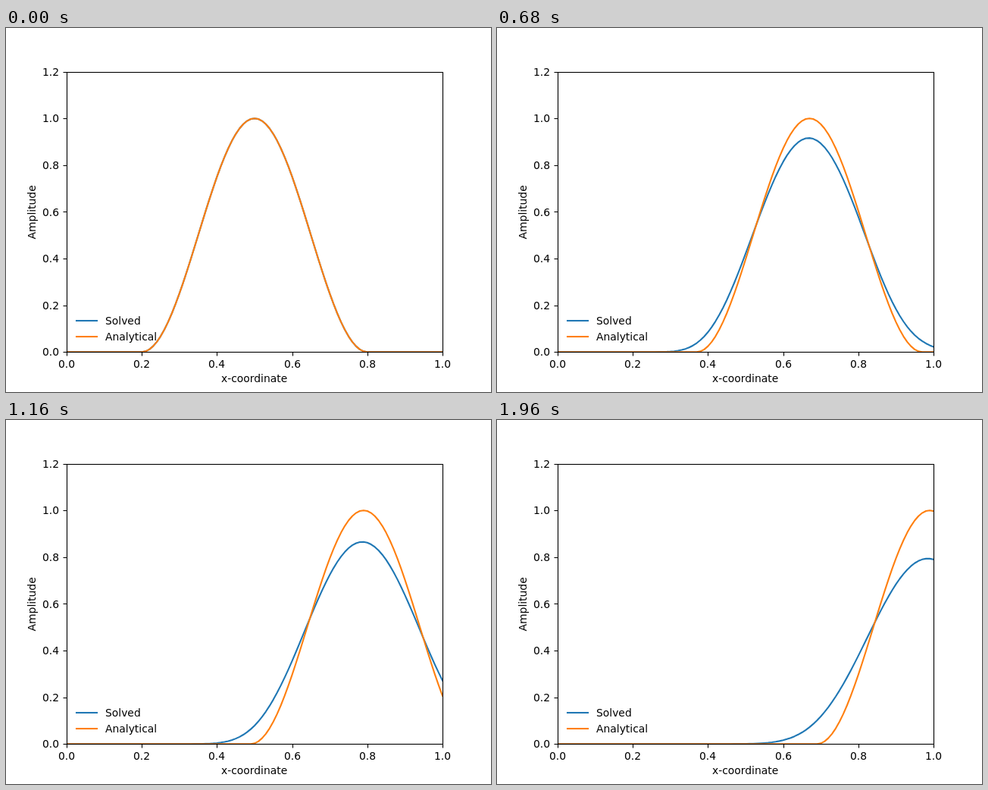
An HTML page with a canvas for the animation above (2 s loop, 640 px wide and 480 px high).

```html
<!DOCTYPE html>
<html lang="en">
<head>
<meta charset="utf-8">
<title>Advection</title>
<style>
html, body { margin: 0; width: 100%; height: 100%; overflow: hidden; background: #fff; }
canvas { display: block; }
</style>
</head>
<body>
<canvas id="plot" width="640" height="480"></canvas>
<script>
const ctx = document.getElementById('plot').getContext('2d');
const STEPS = 50, STEP_MS = 40, CELLS = 100, SHIFT = 0.01;
const LEFT = 80, RIGHT = 576, TOP = 57.6, BOTTOM = 427.2;
const BLUE = '#1f77b4', ORANGE = '#ff7f0e';

const px = x => LEFT + x * (RIGHT - LEFT);
const py = y => BOTTOM - y * (BOTTOM - TOP) / 1.2;
const snap = v => Math.floor(v + 0.5) + 0.5;

// Raised cosine pulse of half width 0.3
function pulse(x, center) {
  const d = Math.abs(x - center);
  return d < 0.3 ? 0.5 + 0.5 * Math.cos(Math.PI * d / 0.3) : 0;
}

const exact = n => Array.from({ length: CELLS + 1 }, (_, i) => pulse(i / CELLS, 0.5 + n * SHIFT));

// Implicit upwind scheme with Courant number 1
function advance(u) {
  let prev = 0;
  return u.map((v, i) => (prev = i ? (v + prev) / 2 : 0));
}

const solved = [exact(0)];
while (solved.length < STEPS) solved.push(advance(solved[solved.length - 1]));

function line(points, color, width, cap) {
  ctx.beginPath();
  points.forEach(([x, y]) => ctx.lineTo(x, y));
  ctx.strokeStyle = color;
  ctx.lineWidth = width;
  ctx.lineCap = cap;
  ctx.lineJoin = 'round';
  ctx.stroke();
}

const curve = (values, color) =>
  line(values.map((v, i) => [px(i / CELLS), py(v)]), color, 2.083, 'square');

const thin = (...points) => line(points, '#000', 1.111, 'butt');

// align: 0 left, 0.5 center, 1 right
function label(str, x, y, align) {
  ctx.fillText(str, Math.round(x - ctx.measureText(str).width * align), y);
}

function axes() {
  const l = snap(LEFT), r = snap(RIGHT), t = snap(TOP), b = snap(BOTTOM);
  ctx.strokeStyle = '#000';
  ctx.lineWidth = 1.111;
  ctx.lineJoin = 'miter';
  ctx.strokeRect(l, t, r - l, b - t);

  for (let i = 0; i <= 6; i++) {
    const v = i / 5, name = v.toFixed(1), y = py(v);
    thin([l, snap(y)], [l - 5, snap(y)]);
    label(name, 70.3, Math.round(y + 5.27), 1);
    if (i > 5) continue;
    const x = px(v);
    thin([snap(x), b], [snap(x), b + 5]);
    label(name, x, 448, 0.5);
  }

  label('x-coordinate', 328, 467, 0.5);
  ctx.save();
  ctx.translate(39, 242.4);
  ctx.rotate(-Math.PI / 2);
  label('Amplitude', 0, 0, 0.5);
  ctx.restore();
}

function legend(name, color, y) {
  line([[93, y], [120, y]], color, 2.083, 'square');
  label(name, 131, y + 5, 0);
}

function draw(n) {
  ctx.fillStyle = '#fff';
  ctx.fillRect(0, 0, 640, 480);

  ctx.save();
  ctx.beginPath();
  ctx.rect(80, 58, 497, 370);
  ctx.clip();
  curve(solved[n], BLUE);
  curve(exact(n), ORANGE);
  ctx.restore();

  ctx.fillStyle = '#000';
  ctx.font = '13.889px "DejaVu Sans", sans-serif';
  axes();
  legend('Solved', BLUE, 386);
  legend('Analytical', ORANGE, 407);
}

function tick() {
  draw(Math.floor(performance.now() / STEP_MS) % STEPS);
  requestAnimationFrame(tick);
}
tick();
</script>
</body>
</html>
```
